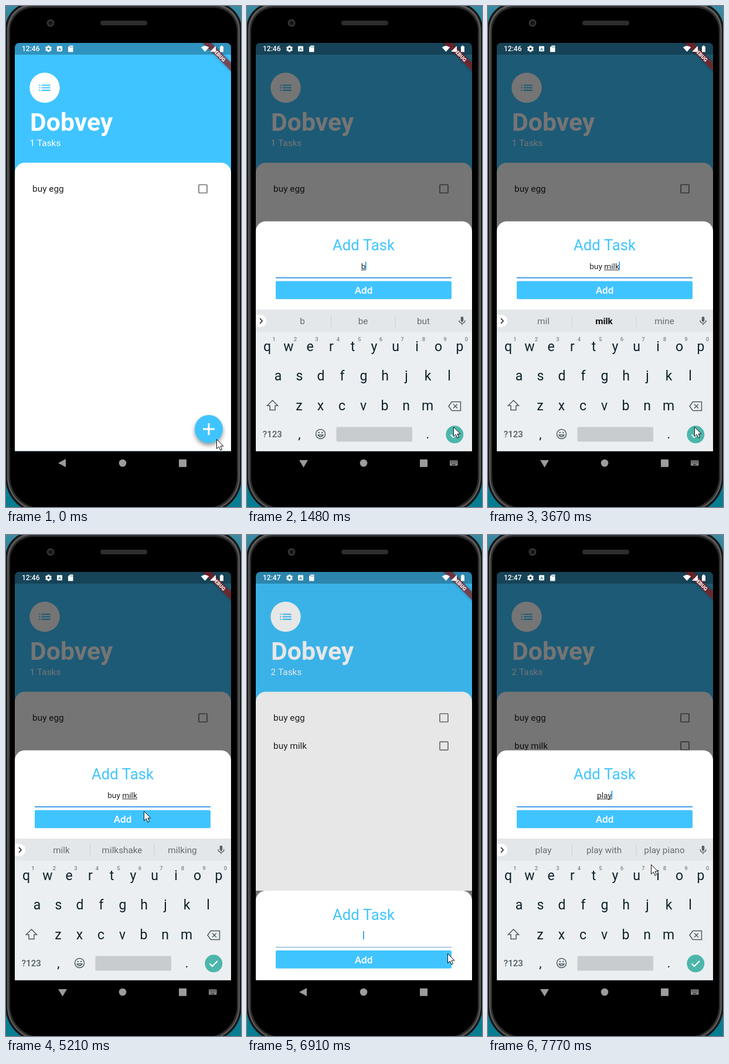
Write an HTML page with a canvas that moves like this. It is 401 by 855 pixels and loops after 8000 ms.

```html
<!DOCTYPE html>
<html lang="en">
<head>
<meta charset="utf-8">
<title>To-do app</title>
<style>
  html, body { margin: 0; width: 100%; height: 100%; overflow: hidden; background: #0b7285; }
  canvas { display: block; }
</style>
</head>
<body>
<canvas id="stage" width="401" height="855"></canvas>
<script>
const ctx = document.getElementById('stage').getContext('2d');
const LOOP = 8000;
const BLUE = '#40c4ff';
const LEFT = 15, RIGHT = 384, TOP = 63, BOTTOM = 759.5;

// Bursts of screen updates: start, end, number of updates. The picture holds in between.
const bursts = [
  [80, 460, 6], [630, 930, 5], [1100, 1480, 6], [1790, 1940, 3], [2110, 2190, 2],
  [2410, 2410, 1], [2660, 2660, 1], [3120, 3190, 2], [3670, 3740, 2], [4200, 4970, 11],
  [5140, 5210, 2], [5440, 5440, 1], [5610, 6380, 11], [6610, 6990, 6], [7140, 7770, 9]
];

// Tracks hold [time, value, ...] keys with linear motion between them.
const sheetTrack = [
  [705, 760], [780, 690], [855, 607], [930, 515.5], [1100, 367.5], [5610, 367.5], [5687, 410],
  [5764, 520], [5841, 627], [5918, 715], [5995, 760], [6762, 760], [6838, 690], [6914, 607],
  [6990, 515.5], [7140, 367.5]
];
const scrimTrack = [
  [705, 0], [780, .03], [855, .094], [930, .255], [1100, .54], [5610, .54], [5687, .45],
  [5764, .25], [5841, .067], [5918, 0], [6762, 0], [6838, .03], [6914, .094], [6990, .255], [7140, .54]
];
const keyboardTrack = [
  [1100, 0], [1176, .5], [1252, .8], [1328, 1], [5687, 1], [5764, .82], [5841, .57],
  [5918, .25], [5995, 0], [7140, 0], [7219, .5], [7298, 1]
];
const mouseTrack = [
  [0, 359, 739], [308, 352, 692], [460, 352, 718], [4200, 352, 718], [4354, 376, 694],
  [4508, 388, 640], [4739, 350, 560], [4970, 249, 501], [5140, 240, 480], [5210, 235, 471],
  [5440, 251, 481], [5610, 250, 484], [5841, 250, 487], [5995, 260, 530], [6380, 342, 714],
  [7140, 342, 714], [7376, 325, 670], [7770, 278, 562]
];
const typed = [
  [0, ''], [1404, 'b'], [1790, 'bu'], [2110, 'buy'], [2190, 'buy '], [2410, 'buy m'], [2660, 'buy mi'],
  [3120, 'buy mil'], [3670, 'buy milk'], [6400, ''], [7376, 'p'], [7455, 'pl'], [7612, 'pla'], [7691, 'play']
];
const suggestions = [
  [0, "the|I|I'm"], [1480, 'b|be|but'], [1865, 'but|buy|bunch'], [2190, 'it|a|the'], [2410, 'm|my|me'],
  [2660, 'mi|milk|mine'], [3190, 'mil|*milk|mine'], [3740, 'milk|milkshake|milking'], [6400, "the|I|I'm"],
  [7455, 'p|play|please'], [7612, 'pla|play|place'], [7770, 'play|play with|play piano']
];

function snap(time) {
  let shown = 0;
  for (const [start, end, count] of bursts) {
    if (time + 10 < start) break;
    const gap = count > 1 ? (end - start) / (count - 1) : 1;
    shown = Math.min(end, start + Math.floor((time + 10 - start) / gap) * gap);
  }
  return shown;
}

function track(keys, t) {
  const next = keys.findIndex(key => key[0] > t);
  if (next < 0) return keys[keys.length - 1].slice(1);
  if (next === 0) return keys[0].slice(1);
  const a = keys[next - 1], b = keys[next], p = (t - a[0]) / (b[0] - a[0]);
  return a.slice(1).map((v, i) => v + (b[i + 1] - v) * p);
}

const latest = (list, t) => list.filter(item => item[0] <= t + 5).pop()[1];

function box(x, y, w, h, fill, r = 0) {
  ctx.beginPath();
  ctx.roundRect(x, y, w, h, r);
  ctx.fillStyle = fill;
  ctx.fill();
}
function disc(x, y, r, fill) {
  ctx.beginPath();
  ctx.arc(x, y, r, 0, 7);
  ctx.fillStyle = fill;
  ctx.fill();
}
function path(d, { x = 0, y = 0, fill, stroke, width = 1 }) {
  ctx.save();
  ctx.translate(x, y);
  const shape = new Path2D(d);
  if (fill) { ctx.fillStyle = fill; ctx.fill(shape); }
  if (stroke) { ctx.strokeStyle = stroke; ctx.lineWidth = width; ctx.stroke(shape); }
  ctx.restore();
}
function text(s, x, y, size, fill, align = 'left', weight = 400) {
  ctx.font = `${weight} ${size}px Roboto, sans-serif`;
  ctx.textAlign = align;
  ctx.fillStyle = fill;
  ctx.fillText(s, x, y);
}
function shadow(color, blur, y = 0) {
  ctx.shadowColor = color;
  ctx.shadowBlur = blur;
  ctx.shadowOffsetY = y;
}

function drawPhone() {
  const sea = ctx.createLinearGradient(0, 0, 0, 855);
  sea.addColorStop(0, '#3a8ca3');
  sea.addColorStop(.1, '#0b7285');
  sea.addColorStop(1, '#077d92');
  box(0, 0, 401, 855, sea);
  box(-1, -6, 403, 871, '#161616', [45, 45, 60, 60]);
  box(2, -3, 397, 865, '#5c5c5c', [43, 43, 58, 58]);
  box(4.5, 0, 392, 860, '#2c2c2c', [41, 41, 56, 56]);
  box(7, 3, 387, 854, '#000', [39, 39, 54, 54]);
  disc(76, 29, 6.5, '#333');
  disc(76, 29, 3.5, '#151515');
  box(161, 25, 80, 8, '#2d2d2d', 4);
}

function drawTask(label, y) {
  text(label, 45, y + 5, 15.4, '#212121');
  ctx.strokeStyle = '#757575';
  ctx.lineWidth = 1.7;
  ctx.beginPath();
  ctx.roundRect(329, y - 7, 14, 14, 1);
  ctx.stroke();
}

function drawPage(t) {
  const tasks = t >= 5680 ? ['buy egg', 'buy milk'] : ['buy egg'];
  box(LEFT, TOP, 369, 697, BLUE);
  box(LEFT, TOP, 369, 20, 'rgba(0,0,0,.25)');
  disc(66, 139.5, 25.7, '#fff');
  for (let i = 0; i < 3; i++) {
    box(56.4, 134.2 + i * 4.3, 2.1, 2.1, BLUE);
    box(60.7, 134.2 + i * 4.3, 15, 2.1, BLUE);
  }
  text('Dobvey', 41, 213, 42.7, '#fff', 'left', 700);
  text(`${tasks.length} Tasks`, 40.5, 239, 15.4, '#fff');
  box(LEFT, 267.5, 369, 493, '#fff', [17, 17, 0, 0]);
  tasks.forEach((label, i) => drawTask(label, 312 + i * 47.8));

  ctx.save();
  shadow('rgba(0,0,0,.4)', 7, 4);
  disc(346, 722, 24, BLUE);
  ctx.restore();
  const press = [630, 6610].map(start => (t - start + 76) / 230).find(p => p > 0 && p <= 1);
  if (press) disc(346, 722, 24 * press, 'rgba(255,255,255,.2)');
  box(336, 720.5, 20, 3, '#fff');
  box(344.5, 712, 3, 20, '#fff');
}

function drawSheet(t, top) {
  const closing = t >= 5680 && t < 6400;
  const value = latest(typed, t);
  const focused = top < 400;
  box(LEFT, top, 369, 400, '#757575');
  box(LEFT, top, 369, 400, '#fff', [17, 17, 0, 0]);
  text('Add Task', 199, top + 49.5, 25.6, BLUE, 'center');
  text(value, 198.5, top + 81, 13.7, closing ? '#555' : '#222', 'center');

  const half = ctx.measureText(value).width / 2;
  const word = value.split(' ').pop();
  if (word && !closing) {
    const width = ctx.measureText(word).width;
    box(198.5 + half - width, top + 82.5, width, 1, '#333');
  }
  const blinkedOff = (t >= 4200 && t < 4700) || (t >= 5140 && t < 5610);
  if (!closing && !blinkedOff) box(198 + half, top + 69, 1.7, 14, '#2196f3');
  if (focused) box(49, top + 95.5, 300, 1.8, '#2f93e8');
  else box(49, top + 96, 300, 1, t > 6400 ? '#649fca' : '#999');
  box(49, top + 102, 300, 30.7, BLUE, 2);
  text('Add', 199, top + 123.5, 17.1, '#fff', 'center', 500);
}

function drawKeyboard(t, alpha) {
  const ink = '#0c222b', soft = '#4c5b62';
  ctx.save();
  ctx.globalAlpha = alpha;
  ctx.translate(0, 56 * (1 - alpha));
  box(LEFT, 518, 369, 241.5, '#eceff1');
  box(LEFT, 518, 369, 38, '#e4e7e9');
  box(LEFT, 527, 18, 21, '#fff', [0, 10, 10, 0]);
  path('M0 0l4 4.3-4 4.3', { x: 22, y: 533.2, stroke: '#333', width: 1.8 });
  latest(suggestions, t).split('|').forEach((word, i) => {
    const bold = word[0] === '*';
    text(word.replace('*', ''), [94.5, 198, 301][i], 543, 15.3, bold ? '#111' : '#626d73', 'center', bold ? 700 : 400);
  });
  box(143, 528, 1, 20, '#cbd0d3');
  box(252.5, 528, 1, 20, '#cbd0d3');
  box(364.7, 530, 4.6, 9, '#566168', 2.3);
  path('M-5 0a5 5 0 0 0 10 0M0 5v3', { x: 367, y: 536.5, stroke: '#566168', width: 1.5 });

  const row = (letters, x, y) => [...letters].forEach((c, i) => text(c, x + i * 36.5, y, 23, ink, 'center'));
  row('qwertyuiop', 34.5, 588.5);
  row('asdfghjkl', 53, 639);
  row('zxcvbnm', 89, 689.5);
  [...'1234567890'].forEach((n, i) => text(n, 46 + i * 36.5, 572, 9.5, '#77848a', 'center', 500));

  path('M0-9l9 9H4.5v7.5h-9V0H-9z', { x: 43.5, y: 682, stroke: soft, width: 1.5 });
  path('M-10.5 0l5.5-7.5H10v15H-5zM-2.5-3.5l7 7m0-7l-7 7', { x: 354.5, y: 683, stroke: soft, width: 1.5 });
  text('?123', 43.3, 736, 15, soft, 'center', 500);
  text(',', 89.5, 738, 22, ink, 'center');
  path('M8 0a8 8 0 1 1-16 0a8 8 0 1 1 16 0M-4.3 1.5a4.6 4.6 0 0 0 8.6 0z', { x: 125.5, y: 730.5, stroke: soft, width: 1.5 });
  disc(122.8, 728, 1.2, soft);
  disc(128.2, 728, 1.2, soft);
  box(152.5, 718.5, 129.5, 25, '#c8cccf', 2);
  text('.', 308.5, 738, 22, ink, 'center');
  disc(354.3, 731.3, 15, '#4db6ac');
  path('M-6.5 0l4.5 4.5 9-9', { x: 354, y: 731.5, stroke: '#fff', width: 2 });
  ctx.restore();
}

function drawBanner() {
  ctx.save();
  ctx.translate(RIGHT, TOP);
  ctx.rotate(Math.PI / 4);
  shadow('rgba(0,0,0,.5)', 5);
  box(-50, 23.9, 100, 10.25, 'rgba(160,24,24,.6)');
  shadow('transparent', 0);
  text('DEBUG', 0, 32.2, 8.7, '#fff', 'center', 900);
  ctx.restore();
}

function drawStatus(t) {
  text(t < 6300 ? '12:46' : '12:47', 27, 77, 12, '#fff', 'left', 500);
  ctx.lineWidth = 2.6;
  ctx.strokeStyle = '#fff';
  ctx.beginPath();
  ctx.arc(72.5, 73, 3.2, 0, 7);
  ctx.stroke();
  for (let i = 0; i < 6; i++) {
    ctx.save();
    ctx.translate(72.5, 73);
    ctx.rotate(i * Math.PI / 3);
    box(-1.4, -5.6, 2.8, 2.5, '#fff');
    ctx.restore();
  }
  box(87, 68.5, 9, 9, '#fff', 1);
  text('A', 91.5, 75.8, 7.5, '#2c7fa4', 'center', 700);
  path('M3 0h5.5v11H0V3z', { x: 106, y: 67.5, fill: '#fff' });
  for (let i = 0; i < 3; i++) box(109 + i * 1.8, 69, .8, 2, '#2c7fa4');
  path('M-6.8-7.5Q0-12.5 6.8-7.5L0 0z', { x: 339.5, y: 78, fill: '#fff' });
  path('M0 0h10v-10z', { x: 348, y: 78, fill: '#fff' });
  path('M0 1.5h1.7V0h2.6v1.5H6V11H0z', { x: 365, y: 67.5, fill: '#fff' });
}

function drawNav(withKeyboard) {
  const gray = '#9c9c9c';
  path(withKeyboard ? 'M89 775h15l-7.5 12.5z' : 'M89 780l13-7v14z', { fill: gray });
  disc(199, 780, 6.3, gray);
  box(295, 773.7, 13, 13, gray, 1);
  if (!withKeyboard) return;
  box(346, 775.5, 13.5, 9, '#8a8a8a', 1);
  for (let i = 0; i < 5; i++) {
    box(347.5 + i * 2.3, 777, 1.2, 1.2, '#111');
    box(347.5 + i * 2.3, 779.4, 1.2, 1.2, '#111');
  }
  box(350, 782, 5.5, 1.1, '#111');
}

function drawMouse(x, y) {
  path('M0 0V16L3.8 12.6 6.4 18.6 9 17.5 6.5 11.6H11.5Z', { x: x + .5, y: y + .5, fill: '#fff', stroke: '#111' });
}

function draw(t) {
  const [top] = track(sheetTrack, t);
  const [scrim] = track(scrimTrack, t);
  const [keyboard] = track(keyboardTrack, t);
  drawPhone();
  ctx.save();
  ctx.beginPath();
  ctx.roundRect(LEFT, TOP, RIGHT - LEFT, BOTTOM - TOP, [8, 8, 0, 0]);
  ctx.clip();
  drawPage(t);
  box(LEFT, TOP, 369, 697, `rgba(0,0,0,${scrim})`);
  if (top < BOTTOM) drawSheet(t, top);
  drawBanner();
  drawStatus(t);
  ctx.restore();
  if (keyboard > 0) drawKeyboard(t, keyboard);
  drawNav((t >= 1170 && t < 5680) || t >= 7210);
  drawMouse(...track(mouseTrack, t));
}

const begin = performance.now();
function tick() {
  draw(snap((performance.now() - begin) % LOOP));
  requestAnimationFrame(tick);
}
tick();
</script>
</body>
</html>
```
